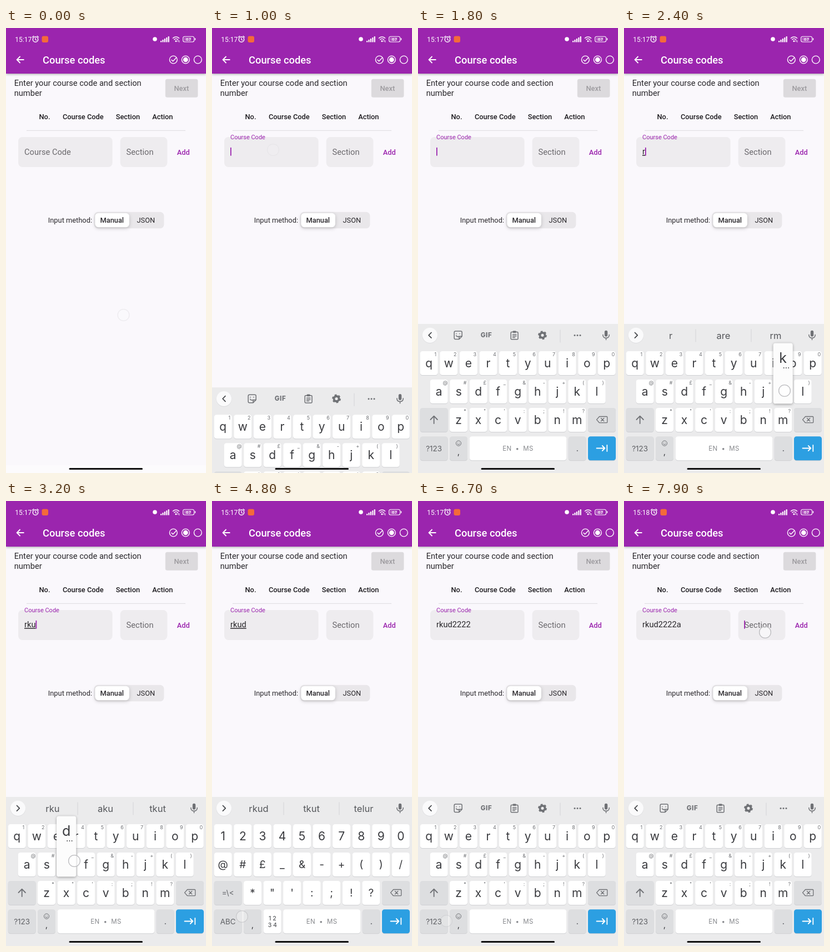
Recreate the animation shown at these times as an HTML page. Size 360 by 800 pixels, loop 8 s.

```html
<!DOCTYPE html>
<html lang="en">
<head>
<meta charset="utf-8">
<title>Course codes</title>
<style>
html, body { margin: 0; width: 100%; height: 100%; overflow: hidden; background: #faf8fc; }
svg { display: block; width: 360px; height: 800px; font-family: Roboto, sans-serif; }
text { white-space: pre; }
.mid { text-anchor: middle; }
.bold { font-weight: 500; }
.kb { font-family: Inter, Roboto, sans-serif; }
.line { fill: none; stroke: #6f7175; stroke-width: 1.5; stroke-linecap: round; stroke-linejoin: round; }
.white { stroke: #fff; }
.bar { filter: drop-shadow(0 1.5px 2px rgba(0,0,0,.35)); }
.thumb { filter: drop-shadow(0 2px 3px rgba(0,0,0,.2)); }
.pop { filter: drop-shadow(0 1px 2px rgba(0,0,0,.35)); }
</style>
</head>
<body>
<svg id="stage" viewBox="0 0 360 800"></svg>
<script>
const LOOP = 8000, PURPLE = '#9b25ae', INK = '#3a3b3f', GREY = '#6f7175';
const esc = s => s.replace(/&/g, '&amp;').replace(/</g, '&lt;');
const text = (x, y, s, size, fill, cls = '', extra = '') =>
  `<text x="${x}" y="${y}" font-size="${size}" fill="${fill}" class="${cls}" ${extra}>${esc(s)}</text>`;
const rect = (x, y, w, h, r, fill, extra = '') =>
  `<rect x="${x}" y="${y}" width="${w}" height="${h}" rx="${r}" fill="${fill}" ${extra}/>`;
const line = (d, cls = '', extra = '') => `<path d="${d}" class="line ${cls}" ${extra}/>`;
const dot = (x, y, r, fill, extra = '') => `<circle cx="${x}" cy="${y}" r="${r}" fill="${fill}" ${extra}/>`;

function statusBar() {
  const bars = [0, 1, 2, 3, 4].map(i => rect(278 + i * 3.4, 23 - i * 2, 2.2, 2.5 + i * 2, .6, '#fff')).join('');
  return text(16.3, 25, '15:17', 12, '#fff', '', 'id="clock"') +
    `<g id="notes">` +
    `<circle cx="53" cy="20.5" r="4.7" class="line white" stroke-width="1.3"/>` +
    line('M53 18v3l2 1M47.5 16.5l2.3-2M58.5 16.5l-2.3-2', 'white', 'style="stroke-width:1.3"') +
    rect(64.5, 14.5, 11.5, 11.5, 3, '#f46a3a') + `</g>` +
    dot(268, 20, 3.8, '#fff') + bars +
    line('M300.5 18.2a8 8 0 0 1 11 0M302.8 20.8a4.7 4.7 0 0 1 6.4 0', 'white') +
    dot(306, 23.6, 1.6, '#fff') +
    line('M309.6 24.6v-3M311.8 22.5v3', 'white', 'style="stroke-width:.9"') +
    rect(318.6, 15.2, 20, 9.8, 3, 'none', 'stroke="#fff" stroke-width="1.1"') +
    rect(339.8, 18, 1.4, 4, .6, '#fff') +
    rect(320.4, 17, 13, 6.3, 1.4, '#fff', 'opacity=".28"') +
    text(328.4, 23.2, '67', 8, '#fff', 'mid bold');
}

function page() {
  return rect(0, 0, 360, 800, 0, '#faf8fc') + rect(0, 786, 360, 14, 0, '#fcfbfd') +
    rect(0, 0, 360, 82, 0, PURPLE, 'class="bar"') + statusBar() +
    line('M32.5 57H20M25.6 51l-6 6 6 6', 'white', 'style="stroke-width:1.8;stroke-linecap:butt;stroke-linejoin:miter"') +
    text(66, 63.8, 'Course codes', 18.33, '#fff', 'bold') +
    [301.3, 323.3, 345.3].map(x => dot(x, 57, 6.9, 'none', 'stroke="#fff" stroke-width="1.4"')).join('') +
    line('M298 57.2l2.5 2.5 6-6.2', 'white') + dot(323.3, 57, 4.4, '#fff') +
    text(14.7, 104.3, 'Enter your course code and section', 14.67, '#29272b') +
    text(14.7, 121.5, 'number', 14.67, '#29272b') +
    rect(286.8, 91.8, 58.6, 33, 3.5, '#dcdadd') + text(315.8, 112.6, 'Next', 12.83, '#9c9a9e', 'mid bold') +
    [['No.', 69.5], ['Course Code', 138.8], ['Section', 219.4], ['Action', 281.8]]
      .map(([s, x]) => text(x, 164.2, s, 12.83, '#1d1b1f', 'mid bold')).join('') +
    rect(37, 183.8, 286, 1, 0, '#dcdade') +
    rect(22, 196, 169.6, 54, 7.5, '#eeecef') + rect(205.7, 196, 84.6, 54, 7.5, '#eeecef') +
    text(0, 0, 'Course Code', 14.67, '#6b696d', '', 'id="label"') +
    text(216.6, 227.9, 'Section', 14.67, '#6b696d') +
    text(319.3, 227.8, 'Add', 12.83, PURPLE, 'mid bold') +
    text(33, 227.2, '', 14.67, '#29272b', '', 'id="code"') +
    rect(0, 214.8, 1.8, 15, .8, PURPLE, 'id="caret"') +
    text(75.8, 350, 'Input method:', 12.83, '#29272b') +
    rect(158.6, 330.8, 125.8, 29.4, 7, '#e9e7ea') +
    rect(160.3, 332.8, 61.6, 25.4, 6.2, '#fff', 'class="thumb"') +
    text(190.8, 350, 'Manual', 12.83, '#29272b', 'mid bold') +
    text(251.8, 350, 'JSON', 12.83, '#29272b', 'mid');
}

// Keyboard geometry
const ROWS = [581, 632, 683, 734.3];
const wideX = i => 19.8 + i * 35.55, midX = i => 37.7 + i * 35.5, lowX = i => 73 + i * 35.55;
function key(cx, row, label, w = 32, fill = '#fff', size = 21, color = INK) {
  const y = ROWS[row], x = cx - w / 2;
  return rect(x, y + 1, w, 43, 4.5, '#cfd0d3') + rect(x, y, w, 43, 4.5, fill) +
    text(cx, y + 21.5 + size * .355, label, size, color, 'mid');
}
const grey = (cx, row, label, w, size) => key(cx, row, label, w, '#dddee0', size, '#606266');
const hint = (cx, row, s) => text(cx + 11.5, ROWS[row] + 9, s, 9, GREY, 'mid');
const run = (chars, at, row, size) => [...chars].map((c, i) => key(at(i), row, c, 32, '#fff', size)).join('');
const hints = (chars, at, row) => [...chars].map((c, i) => hint(at(i), row, c)).join('');
const spaceLabel = x => text(x, 760, 'EN  •  MS', 11.5, '#86888c', 'mid', 'letter-spacing=".3"');

function letters() {
  return run('qwertyuiop', wideX, 0) + hints('1234567890', wideX, 0) +
    run('asdfghjkl', midX, 1) + hints('@#£_&-+()', midX, 1) +
    run('zxcvbnm', lowX, 2) + hints('*"\':;!?', lowX, 2) +
    grey(28.7, 2, '', 50, 14) + line('M28.7 711v-13M22.5 704l6.2-6.4 6.2 6.4', '', 'style="stroke-width:1.8"') +
    grey(28.7, 3, '?123', 50, 13.5) + grey(73, 3, '', 32, 14) + text(73, 766.5, ',', 15, INK, 'mid') +
    dot(73, 746.6, 4.6, 'none', 'stroke="#6f7175" stroke-width="1"') +
    line('M70.6 747.8q2.4 2.6 4.8 0M71.4 745.2v.1M74.6 745.2v.1', '', 'style="stroke-width:1"') +
    key(180, 3, '', 174.5) + spaceLabel(180);
}
function symbols() {
  return run('1234567890', wideX, 0) + run('@#£_&-+()/', wideX, 1, 19) + run('*"\':;!?', lowX, 2, 19) +
    grey(28.7, 2, '=\\<', 50, 13.5) + grey(28.7, 3, 'ABC', 50, 13.5) +
    grey(73, 3, '', 32, 14) + text(73, 766.5, ',', 15, INK, 'mid') +
    key(108.6, 3, '') + text(108.8, 753.5, '1 2', 10.5, '#55575b', 'mid bold') + text(108.8, 765.5, '3 4', 10.5, '#55575b', 'mid bold') +
    key(197.6, 3, '', 139) + spaceLabel(197.6);
}
function tools() {
  return line('M24 547.5l-4.8 4.8 4.8 4.8', '', 'style="stroke:#3f4145;stroke-width:1.7"') +
    line('M67.5 545h9.500q2.200 0 2.200 2.200v7l-5.200 5.300h-6.500q-2.300 0-2.300-2.300v-9.900q0-2.300 2.300-2.300zM79 554.200h-2.800q-2.200 0-2.200 2.200v3M68.600 553q2.400 3 5.400 1.200M69 549.400v.4M75 549.400v.4') +
    text(123, 556.2, 'GIF', 11.5, GREY, 'mid', 'font-weight="800" letter-spacing=".6"') +
    line('M168.600 546.500h10q1.400 0 1.400 1.400v10.500q0 1.400-1.400 1.400h-10q-1.400 0-1.400-1.400v-10.500q0-1.400 1.400-1.400zM170.500 551h6.400M170.500 553.700h6.400M170.500 556.400h4') +
    rect(170.6, 544.4, 6, 3.6, 1.2, GREY) +
    dot(224, 552.3, 4.5, 'none', 'stroke="#6f7175" stroke-width="3.8"') +
    dot(224, 552.3, 6.8, 'none', 'stroke="#6f7175" stroke-width="2.2" stroke-dasharray="3.7 3.42"') +
    rect(255.5, 542.5, 1, 23, 0, '#d3d4d6') +
    [282, 287, 292].map(x => dot(x, 552.5, 1.5, GREY)).join('');
}
function words() {
  return line('M19.5 547.500l4.800 4.800-4.800 4.800', '', 'style="stroke:#3f4145;stroke-width:1.7"') +
    [84, 179, 273].map(x => text(x, 558.6, '', 16.5, '#55575b', 'mid', 'data-word')).join('') +
    [129, 229].map(x => rect(x - .5, 541.5, 1, 23, 0, '#d3d4d6')).join('');
}
function keyboard() {
  return `<g id="board" class="kb">` + rect(0, 532, 360, 268, 0, '#ebebec') +
    dot(21.5, 553, 13.8, '#d9dadc') + dot(21.5, 552.3, 13.6, '#fafafb') +
    `<g id="tools">${tools()}</g><g id="words">${words()}</g>` +
    rect(335.8, 543.8, 5.4, 11, 2.7, GREY) + line('M332.800 551.500q0 5.800 5.700 5.800t5.700-5.800M338.500 557.500v3') +
    `<g id="letters">${letters()}</g><g id="symbols">${symbols()}</g>` +
    grey(331, 2, '', 50, 14) +
    line('M326.500 698.500h13q1.200 0 1.200 1.200v8.800q0 1.200-1.200 1.200h-13l-5-5.600zM329.500 701.500l5.200 5.200M334.700 701.500l-5.200 5.200', '', 'style="stroke-width:1.3"') +
    grey(286.7, 3, '.', 32, 16) + key(331, 3, '', 50, '#2c9fe2') +
    line('M321.500 755.500h14M331.800 751l4.500 4.500-4.500 4.500M340.300 750v11', 'white', 'style="stroke-width:1.8"') +
    `<g id="pop" class="pop">` + rect(-17.6, -65.5, 35.2, 109, 4, '#fcfcfc') +
    text(0, -30.5, '', 25, INK, 'mid', 'id="popText"') +
    [1.5, 5.7, 9.9].map(x => dot(x, -21, .9, INK)).join('') + `</g></g>`;
}

const $ = id => document.getElementById(id);
$('stage').innerHTML = page() + keyboard() +
  dot(0, 0, 10.4, 'rgba(255,255,255,.55)', 'id="touch" stroke="#bcbcbf" stroke-width="1.3"') +
  rect(113.5, 791, 132.5, 3, 1.5, '#111');
const wordEls = document.querySelectorAll('[data-word]');

// [down, up, touch x, touch y, key, key centre, row]
const TAPS = [
  [690, 800, 110, 219],
  [2000, 2100, 128, 606, 'r', wideX(3), 0],
  [2400, 2500, 289, 652, 'k', midX(7), 1],
  [2790, 2890, 236, 606, 'u', wideX(6), 0],
  [3090, 3290, 123, 647, 'd', midX(2), 1],
  [4620, 4700, 54, 747],
  [5190, 5290, 57, 606, '2', wideX(1), 0],
  [5360, 5430, 57, 606, '2', wideX(1), 0],
  [5510, 5590, 57, 606, '2', wideX(1), 0],
  [5890, 5990, 57, 606, '2', wideX(1), 0],
  [6390, 6540, 51, 755],
  [6990, 7190, 42, 652, 'a', midX(0), 1],
  [7890, 8000, 254, 236]
];
const FOCUS = 790, SWAP = 7890;
const GUESS = {
  r: ['r', 'are', 'rm'], rk: ['rk', 'tk', 'rki'],
  rku: ['rku', 'aku', 'tkut'], rkud: ['rkud', 'tkut', 'telur']
};
const clamp = v => Math.max(0, Math.min(1, v));
const easeOut = u => 1 - (1 - clamp(u)) ** 3;
const show = (id, on) => $(id).setAttribute('display', on ? 'inline' : 'none');
const move = (id, x, y, s = 1) => $(id).setAttribute('transform', `translate(${x} ${y}) scale(${s})`);

function draw(t) {
  const typed = TAPS.filter(p => p[4] && t >= p[1]);
  const code = typed.map(p => p[4]).join('');
  const guess = GUESS[code];

  $('clock').textContent = t < 7000 ? '15:17' : '15:18';
  move('notes', t < 7000 ? 0 : 1, 0);

  const f = easeOut((t - FOCUS) / 167);
  move('label', 33, 227.9 - 28.2 * f, 1 - .25 * f);
  $('label').setAttribute('fill', t < FOCUS ? '#6b696d' : PURPLE);
  $('code').textContent = code;
  $('code').setAttribute('text-decoration', guess ? 'underline' : 'none');

  // The caret restarts its half-second blink on every input
  const last = t >= SWAP ? SWAP : typed.length ? typed[typed.length - 1][1] : FOCUS;
  show('caret', t >= FOCUS && Math.floor((t - last) / 500) % 2 === 0);
  const end = code ? $('code').getComputedTextLength() : 0;
  $('caret').setAttribute('x', t >= SWAP ? 216.2 : 33 + end);

  move('board', 0, 268 * (1 - easeOut((t - 902) / 400)));
  const sym = t >= 4690 && t < 6490;
  show('letters', !sym);
  show('symbols', sym);
  show('tools', !guess);
  show('words', !!guess);
  if (guess) wordEls.forEach((el, i) => el.textContent = guess[i]);

  const held = TAPS.find(p => p[4] && t >= p[0] && t < p[1] + 40);
  show('pop', !!held);
  if (held) {
    move('pop', held[5], ROWS[held[6]]);
    $('popText').textContent = held[4];
  }

  const tap = TAPS.filter(p => t >= p[0]).pop();
  const idle = t < TAPS[0][0];
  const [x, y] = idle ? [211.5, 516] : [tap[2], tap[3]];
  move('touch', x, y);
  $('touch').setAttribute('opacity', idle ? .22 : 1 - clamp((t - tap[1]) / 230));
}

const start = performance.now();
function tick() {
  draw((performance.now() - start) % LOOP);
  requestAnimationFrame(tick);
}
tick();
</script>
</body>
</html>
```
